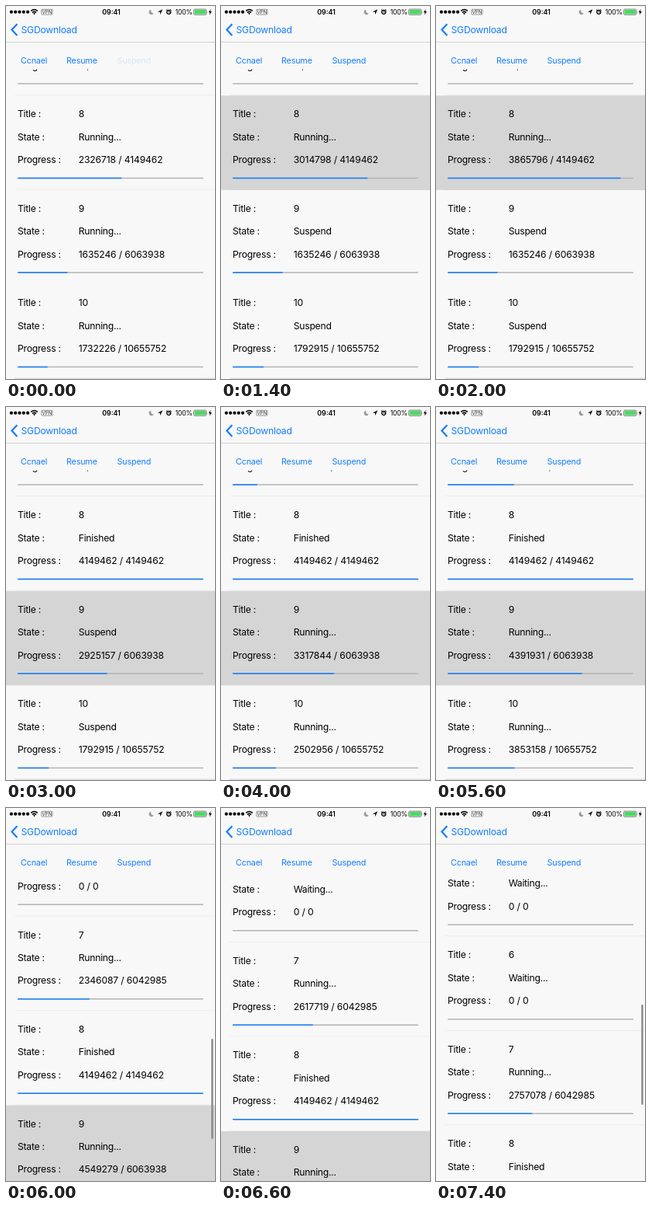
Recreate the animation shown at these times as an HTML page. Size 270x480 px, loop 7.6 s.

```html
<!DOCTYPE html>
<html lang="en">
<head>
<meta charset="utf-8">
<title>Downloads</title>
<style>
  html, body { margin: 0; width: 100%; height: 100%; overflow: hidden; background: #f8f8f8; }
  svg { display: block; width: 100vw; height: 100vh; }
  text { font-family: Inter, Roboto, sans-serif; white-space: pre; }
  .row text { font-size: 12.2px; letter-spacing: -.25px; fill: #000; }
  .row .count { letter-spacing: -.16px; }
  .link { fill: #157efb; font-size: 10.8px; letter-spacing: -.2px; }
  .back { font-size: 12.2px; letter-spacing: -.25px; }
</style>
</head>
<body>
<svg id="stage" viewBox="0 0 270 480">
  <defs><clipPath id="below"><rect y="81.5" width="270" height="398.5"/></clipPath></defs>
  <rect width="270" height="480" fill="#f8f8f8"/>
  <g clip-path="url(#below)"><g id="list"></g></g>
  <rect id="thumb" x="265.3" width="2.3" height="129" rx="1.15" fill="#858585"/>

  <g id="status">
    <g id="dots"></g>
    <g fill="none" stroke="#000" stroke-width="1.5">
      <path d="M32.2 6.4Q36.5 2.6 40.8 6.4M33.9 8.5Q36.5 6.2 39.1 8.5"/>
    </g>
    <path d="M35 9.6Q36.5 8.4 38 9.6L36.5 11.3Z"/>
    <rect x="45.8" y="4.3" width="14.2" height="6.7" rx="1" fill="none" stroke="#555" stroke-width=".6"/>
    <text x="52.9" y="10" font-size="6.2" text-anchor="middle" fill="#333">VPN</text>
    <text x="136" y="11" font-size="8.9" font-weight="600" text-anchor="middle">09:41</text>
    <path d="M187.4 4.6A3.3 3.3 0 1 0 190.8 9.4A3.5 3.5 0 0 1 187.4 4.6Z" fill="#9a9a9a"/>
    <path d="M202.3 4.2L196 7.4L199 7.8L199.3 11Z"/>
    <circle cx="210.3" cy="7.8" r="2.5" fill="none" stroke="#000" stroke-width="1.3"/>
    <path d="M210.3 6.3V8H211.5M206.9 5.6L208.4 4.3M212.2 4.3L213.7 5.6" fill="none" stroke="#000" stroke-width=".9"/>
    <text x="218.8" y="11" font-size="8.6" letter-spacing="-.2">100%</text>
    <rect x="242.6" y="4.1" width="16.2" height="7.2" rx="1.4" fill="none" stroke="#333" stroke-width=".6"/>
    <rect x="243.5" y="5" width="14.4" height="5.4" rx=".7" fill="#4cd964"/>
    <path d="M259.6 6.5Q260.7 7.7 259.6 8.9Z" fill="#333"/>
    <path d="M264.6 4L261.7 8.2H263.5L262.8 11.4L265.9 7H264Z"/>
  </g>

  <path d="M14.4 23.2L7.5 30.6L14.4 38" fill="none" stroke="#157efb" stroke-width="2.2"/>
  <text class="link back" x="19.5" y="35">SGDownload</text>
  <rect y="46" width="270" height=".7" fill="#c4c4c4"/>
  <text class="link" x="19" y="74">Ccnael</text>
  <text class="link" x="78" y="74">Resume</text>
  <text class="link" id="suspend" x="143.6" y="74">Suspend</text>
</svg>
<script>
const LOOP = 7600, STEP = 200, PITCH = 121.5, TOP = 115.25;
const BLUE = '#157efb';
const $ = id => document.getElementById(id);

function add(parent, tag, attrs, text = '') {
  const el = document.createElementNS('http://www.w3.org/2000/svg', tag);
  for (const k in attrs) el.setAttribute(k, attrs[k]);
  el.textContent = text;
  parent.appendChild(el);
  return el;
}

// Piecewise linear value through [time, value] points
function along(points, t) {
  let [t0, v0] = points[0];
  for (const [t1, v1] of points) {
    if (t < t1) return v0 + (v1 - v0) * Math.max(0, (t - t0) / (t1 - t0));
    [t0, v0] = [t1, v1];
  }
  return v0;
}

// Last value whose time has been reached
const latest = (points, t) => points.filter(p => p[0] <= t).pop()[1];

const easeOut = (t, from, to) => 1 - (1 - Math.min(1, Math.max(0, (t - from) / (to - from)))) ** 3;

const RUN = 'Running...', HOLD = 'Suspend', WAIT = 'Waiting...', DONE = 'Finished';
const rows = [
  { n: 5, size: 0, sep: .25, bytes: [[0, 0]], state: [[0, WAIT]] },
  { n: 6, size: 0, sep: .25, bytes: [[0, 0]], state: [[0, WAIT]] },
  { n: 7, size: 6042985, sep: .25, state: [[0, WAIT], [200, HOLD], [3200, RUN]],
    bytes: [[3100, 0], [4000, 806000], [5600, 2165000], [6600, 2617719], [7400, 2757078]] },
  { n: 8, size: 4149462, sep: .25, picked: [1000, 2200],
    state: [[0, RUN], [200, HOLD], [1000, RUN], [2200, DONE]],
    bytes: [[0, 2326718], [200, 2387407], [1000, 2387407], [1400, 3014798], [2200, 4149462]] },
  { n: 9, size: 6063938, sep: 0, picked: [2200, LOOP],
    state: [[0, RUN], [200, HOLD], [2200, RUN], [3000, HOLD], [3200, RUN]],
    bytes: [[2200, 1635246], [3000, 2925157], [3400, 2925157], [4000, 3317844], [5600, 4391931], [7400, 5100000]] },
  { n: 10, size: 10655752, sep: .9, state: [[0, RUN], [200, HOLD], [3200, RUN]],
    bytes: [[0, 1732226], [200, 1792915], [3150, 1792915], [4000, 2502956], [5600, 3853158], [7400, 5000000]] }
];

for (let i = 0; i < 5; i++) add($('dots'), 'circle', { cx: 6.9 + i * 5.3, cy: 7.7, r: 2.1 });

for (const r of rows) {
  const g = r.g = add($('list'), 'g', { class: 'row' });
  r.bg = add(g, 'rect', { width: 270, height: PITCH, fill: '#d5d5d5' });
  add(g, 'rect', { x: 11.5, y: PITCH - 1, width: 258.5, height: .7, fill: '#b8b8bb', opacity: r.sep });
  const line = (y, label, value, cls = '') => {
    add(g, 'text', { x: 15, y }, label + ' :');
    return add(g, 'text', { x: 93.7, y, class: cls }, value);
  };
  line(28, 'Title', r.n);
  r.label = line(57.4, 'State');
  r.count = line(86.9, 'Progress', '', 'count');
  const bar = { x: 15, y: 105.45, width: 240, height: 1.5, rx: .7 };
  add(g, 'rect', { ...bar, fill: '#b4b4b4' });
  r.bar = add(g, 'rect', { ...bar, fill: BLUE });
}

function draw(t) {
  const scroll = 179.2 * easeOut(t, 5700, 6400) + 114 * easeOut(t, 6600, 7400);
  for (const r of rows) {
    const bytes = Math.floor(along(r.bytes, t));
    const total = bytes ? r.size : 0;
    r.g.setAttribute('transform', `translate(0 ${(TOP + (r.n - 8) * PITCH + scroll).toFixed(2)})`);
    r.bg.setAttribute('opacity', r.picked && t >= r.picked[0] && t < r.picked[1] ? 1 : 0);
    r.label.textContent = latest(r.state, t);
    r.count.textContent = `${bytes} / ${total}`;
    r.bar.setAttribute('width', total ? 240 * bytes / total : 0);
  }
  const moving = (t >= 5800 && t < 6500) || t > 6600;
  $('thumb').setAttribute('y', 253 + .298 * (293.2 - scroll));
  $('thumb').setAttribute('opacity', moving ? 1 : 0);
  $('suspend').setAttribute('opacity', t < 200 ? .15 : 1);
}

const start = performance.now();
function tick() {
  const t = (performance.now() - start) % LOOP;
  draw(Math.floor(t / STEP) * STEP);
  requestAnimationFrame(tick);
}
tick();
</script>
</body>
</html>
```
